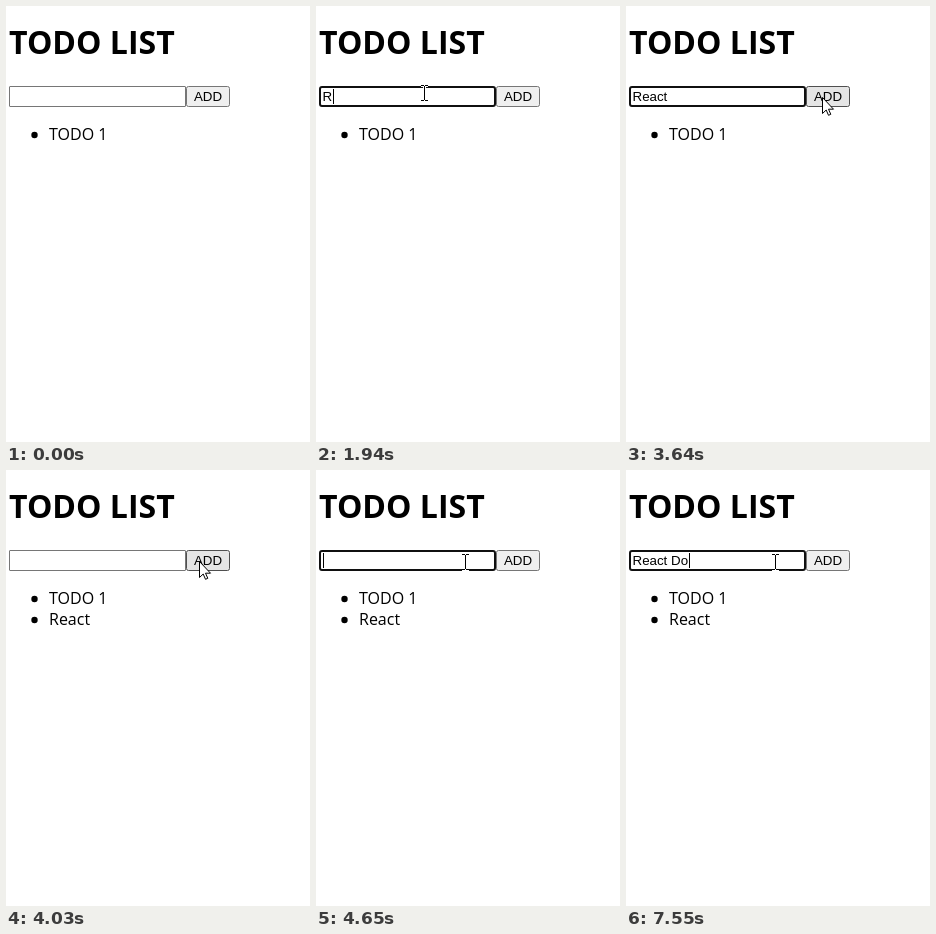
Recreate the animation shown at these times as an HTML page. Size 304x436 px, loop 8000 ms.

```html
<!DOCTYPE html>
<html lang="en">
<head>
<meta charset="utf-8">
<title>Todo list</title>
<style>
  html, body { margin: 0; width: 100%; height: 100%; overflow: hidden; background: #fff; }
  svg { display: block; width: 100vw; height: 100vh; }
  text { font-family: "Open Sans", "Noto Sans", sans-serif; font-size: 16px; white-space: pre; }
  .title { font-size: 32px; font-weight: 700; }
  .ui { font-family: "Liberation Sans", Arial, sans-serif; font-size: 13.333px; }
</style>
</head>
<body>
<svg viewBox="0 0 304 436">
  <text class="title" x="3" y="48">TODO LIST</text>

  <rect id="field" fill="#fff"/>
  <text id="value" class="ui" x="6.5" y="95"></text>
  <rect id="caret" y="83" width="1" height="15"/>

  <rect id="button" x="180.5" y="80.5" width="43" height="20" rx="2"/>
  <text class="ui" x="202" y="95" text-anchor="middle">ADD</text>

  <circle cx="28.5" cy="129" r="3.2"/>
  <text x="43" y="134">TODO 1</text>
  <g id="added">
    <circle cx="28.5" cy="150" r="3.2"/>
    <text x="43" y="155">React</text>
  </g>

  <path id="arrow" d="M.5 .5V16.5L4.2 13 6.5 18.3 8.8 17.3 6.5 12.2H11.5Z" fill="#fff" stroke="#000"/>
  <g id="beam" fill="none">
    <path d="M-3 -7.5H4M.5 -7.5V7.5M-3 7.5H4" stroke="#fff" stroke-width="3"/>
    <path d="M-3 -7.5H0M1 -7.5H4M.5 -7V7M-3 7.5H0M1 7.5H4" stroke="#000"/>
  </g>
</svg>
<script>
const LOOP = 8000, STEP = 76;
const $ = id => document.getElementById(id);
const set = (id, attrs) => { for (const k in attrs) $(id).setAttribute(k, attrs[k]); };
const show = (id, on) => set(id, { visibility: on ? "visible" : "hidden" });

// Each session: focus, blur and clear times, and the time of every key.
const sessions = [
  { focus: 1160, blur: 3710, clear: 3800, text: "React", keys: [1940, 2090, 2330, 2560, 2950] },
  { focus: 4580, blur: LOOP, clear: LOOP, text: "React Do", keys: [5050, 5280, 5520, 5750, 6070, 6220, 7380, 7550] }
];

// Pointer moves: start time, number of steps, from, to.
const moves = [
  [380, 9, [290, 415], [108, 87]],
  [3170, 7, [108, 87], [196, 91]],
  [4030, 6, [196, 91], [149, 92]]
];

const pen = document.createElement("canvas").getContext("2d");
pen.font = '13.333px "Liberation Sans", Arial, sans-serif';

function pointerAt(t) {
  const move = moves.filter(m => t >= m[0]).pop();
  if (!move) return null;
  const [start, steps, from, to] = move;
  const k = Math.min(1, (Math.floor((t - start) / STEP) + 1) / steps);
  const ease = k * k * (3 - 2 * k);
  return from.map((v, i) => Math.round(v + (to[i] - v) * ease));
}

function draw(t) {
  const p = pointerAt(t);
  const inside = (x0, x1) => !!p && p[0] >= x0 && p[0] < x1 && p[1] >= 80 && p[1] < 101;
  const overField = inside(3, 180), overButton = inside(180, 224);
  const pressed = t >= 3710 && t < 3800;

  const s = sessions.find(s => t >= s.focus && t < s.clear);
  const focused = !!s && t < s.blur;
  const typed = s ? s.keys.filter(k => k <= t) : [];
  const value = s ? s.text.slice(0, typed.length) : "";
  $("value").textContent = value;

  set("field", focused
    ? { x: 4, y: 81, width: 175, height: 19, rx: 2, stroke: "#101010", "stroke-width": 2 }
    : { x: 3.5, y: 80.5, width: 176, height: 20, rx: 0.5, stroke: overField ? "#4f4f4f" : "#767676", "stroke-width": 1 });
  set("button", {
    fill: pressed ? "#f5f5f5" : overButton ? "#e5e5e5" : "#efefef",
    stroke: pressed ? "#8d8d8d" : overButton ? "#4f4f4f" : "#767676"
  });

  const idle = s ? t - (typed[typed.length - 1] || s.focus) : 0;
  show("caret", focused && idle % 1010 < 530);
  set("caret", { x: Math.round(7 + pen.measureText(value).width) });

  show("added", t >= 3800);
  show("beam", overField);
  show("arrow", p && !overField);
  if (p) set(overField ? "beam" : "arrow", { transform: `translate(${p})` });
}

function frame() {
  draw(performance.now() % LOOP);
  requestAnimationFrame(frame);
}
frame();
</script>
</body>
</html>
```
